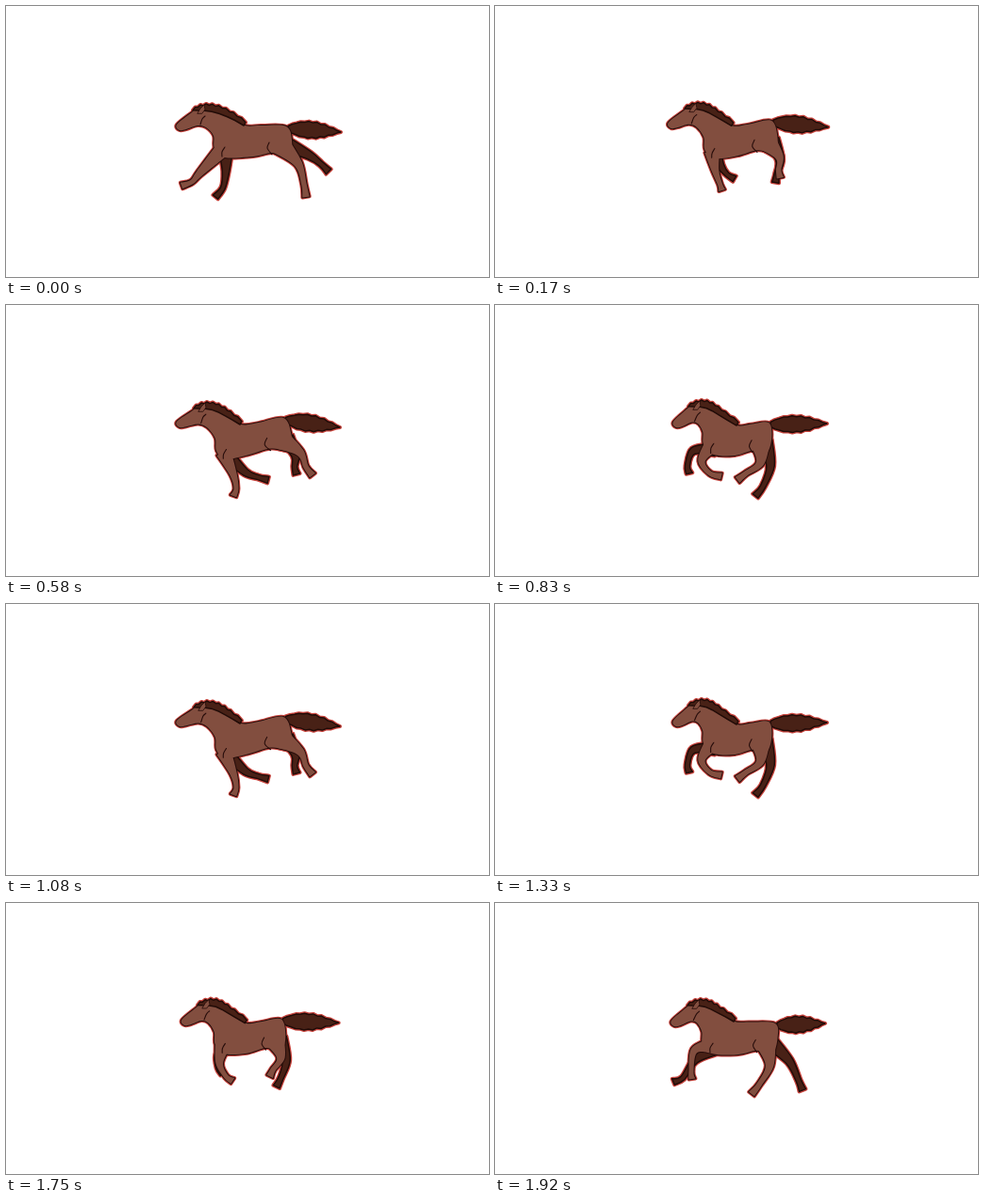
These frames come from a looping animation (512x288 px, 2.01 s). An HTML page:

```html
<!DOCTYPE html>
<html lang="en">
<head>
<meta charset="utf-8">
<title>Galloping horse</title>
<style>
html, body { margin: 0; width: 100%; height: 100%; overflow: hidden; background: #fff; }
svg { display: block; width: 100vw; height: 100vh; }
path { stroke-linejoin: round; stroke-linecap: round; }
.glow { fill: #c8453e; stroke: #c8453e; stroke-width: 4; }
.far { fill: #482116; stroke: #210b07; stroke-width: 1.5; }
.edge { fill: none; stroke: #260c0a; stroke-width: 2; }
.near { fill: #824e3f; }
.ear { fill: #824e3f; stroke: #260c0a; stroke-width: .8; }
.line { fill: none; stroke: #260c0a; stroke-width: 1.1; }
</style>
</head>
<body>
<svg id="stage" viewBox="0 0 512 288"></svg>
<script>
const LOOP = 2010, STEP = 250 / 3, STEPS = 24;
const stage = document.getElementById("stage");

const points = text => text.split(",").map(pair => pair.trim().split(" ").map(Number));
const mix = (a, b, k) => a.map((v, i) => v + (b[i] - v) * k);
const fmt = p => p.map(v => v.toFixed(1)).join(" ");
const range = n => Array.from({ length: n + 1 }, (_, i) => i / n);

// Catmull-Rom spline through the points, as cubic segments.
function curve(pts, closed = false) {
  const n = pts.length;
  const at = i => closed ? pts[(i + n) % n] : pts[Math.max(0, Math.min(n - 1, i))];
  let d = "";
  for (let i = 0; i < (closed ? n : n - 1); i++) {
    const [a, b, c, e] = [at(i - 1), at(i), at(i + 1), at(i + 2)];
    const c1 = b.map((v, j) => v + (c[j] - a[j]) / 6);
    const c2 = c.map((v, j) => v - (e[j] - b[j]) / 6);
    d += `C${fmt(c1)} ${fmt(c2)} ${fmt(c)}`;
  }
  return d;
}
const open = pts => `M${fmt(pts[0])}${curve(pts)}`;
const blob = pts => `M${fmt(pts[0])}${curve(pts, true)}Z`;
const poly = pts => `M${pts.map(fmt).join("L")}Z`;

// Both sides of a ribbon around a spine.
function sides(spine, widths) {
  const side = sign => spine.map(([x, y], i) => {
    const a = spine[Math.max(0, i - 1)], b = spine[Math.min(spine.length - 1, i + 1)];
    const dx = b[0] - a[0], dy = b[1] - a[1];
    const k = sign * widths[i] / 2 / Math.hypot(dx, dy);
    return [x - dy * k, y + dx * k];
  });
  return [side(1), side(-1).reverse()];
}
function limb(joints, widths) {
  const [left, right] = sides(joints, widths);
  return `M${fmt(left[0])}${curve(left)}L${fmt(right[0])}${curve(right)}Z`;
}
function bezier(a, b, c, u) {
  return mix(mix(a, b, u), mix(b, c, u), u);
}

// One resting horse; poses bend it by moving a few handles.
const body = points("181 126,197 113,203 108,216 109,236 117,253 127,271 127,297 128,303 143,300 159,282 156,262 160,232 161,221 151,220 138,212 129,203 127,191 131,184 132");
const ear = points("203 114,206 109,210 105,211 110,208 114");
const lines = ["279 145,277 151,282 158", "232 150,229 155,229 160", "211 117,208 120,206 126"].map(points);
const tailRoot = [299, 130];
const LEGS = [
  { hip: [229, 153], widths: [16, 7.5, 5, 7] },
  { hip: [233, 156], widths: [14, 7.5, 5, 7] },
  { hip: [291, 148], widths: [22, 8.5, 5.5, 7.5] },
  { hip: [297, 147], widths: [16, 8.5, 5.5, 7.5] }
];

// Handles: muzzle, poll, chest, withers, croup, thigh, belly.
// Legs: knee, fetlock and hoof of near front, far front, near hind, far hind.
const pose = (handles, tail, ...legs) => ({ handles: points(handles), tail, legs: legs.map(points) });
const reach = pose("182 127,203 108,221 148,253 127,297 128,301 157,262 160", [355, 134],
  "205 178,197 187,186 191", "233 176,230 193,222 203", "310 168,316 190,318 203", "322 159,334 168,342 176");
const land = pose("182 125,204 107,223 152,249 127,294 120,302 152,258 159", [354, 130],
  "241 180,244 195,241 203", "254 178,267 183,278 186", "312 157,318 172,325 181", "307 160,306 172,308 180");
const gather = pose("190 125,210 105,221 145,257 128,290 125,289 155,254 160", [352, 126],
  "219 166,228 179,240 182", "210 155,204 171,206 179", "281 168,266 179,257 186", "292 171,284 193,276 203");
const push = pose("188 126,209 106,220 147,254 126,297 128,295 158,258 161", [350, 128],
  "211 157,208 179,209 187", "212 167,199 186,189 190", "291 173,280 193,272 203", "312 168,322 189,326 199");
const between = (a, b, k) => {
  const all = (p, q) => p.map((v, i) => mix(v, q[i], k));
  return {
    handles: all(a.handles, b.handles), tail: mix(a.tail, b.tail, k),
    legs: a.legs.map((leg, i) => all(leg, b.legs[i]))
  };
};
const gallop = [reach, land, between(land, gather, 1 / 3), between(land, gather, 2 / 3), gather, push];

// Shifts a resting point with the handles, nearest ones strongest.
const bend = handles => ([x, y]) => {
  let sum = 0, sx = 0, sy = 0;
  reach.handles.forEach(([hx, hy], i) => {
    const weight = 1 / (1 + Math.hypot(x - hx, y - hy) ** 3);
    sum += weight;
    sx += weight * (handles[i][0] - hx);
    sy += weight * (handles[i][1] - hy);
  });
  return [x + sx / sum, y + sy / sum];
};

function tail(root, tip) {
  const us = range(13);
  const widths = us.map((u, i) =>
    (5 * (1 - u) + 14 * Math.sin(Math.PI * u ** 0.85)) * (1 + (i % 2 ? 0.16 : -0.16) * u));
  return poly(sides(us.map(u => mix(root, tip, u)), widths).flat());
}

function mane() {
  const top = range(16).map((u, i) => {
    const [x, y] = bezier([198, 110], [218, 95], [254, 123], u);
    return [x, y + (i % 2 ? -0.9 : 0.7)];
  });
  return [...top, ...range(6).map(u => bezier([252, 127], [225, 110], [203, 111], u))];
}

const draw = (kind, ...paths) => paths.map(d => `<path class="${kind}" d="${d}"/>`).join("");

function horse({ handles, tail: tip, legs }) {
  const move = bend(handles);
  const [nearFront, farFront, nearHind, farHind] = LEGS.map(({ hip, widths }, i) =>
    limb([move(hip), ...legs[i]], widths));
  const far = [farFront, farHind, tail(move(tailRoot), tip)];
  const near = [nearFront, nearHind, blob(body.map(move))];
  const hair = poly(mane().map(move));
  return draw("glow", ...far, ...near, hair)
    + draw("far", ...far) + draw("edge", ...near) + draw("near", ...near)
    + draw("far", hair) + draw("ear", poly(ear.map(move)))
    + draw("line", ...lines.map(line => open(line.map(move))));
}

stage.innerHTML = gallop.map(p => `<g display="none">${horse(p)}</g>`).join("");
let shown = -1;

function update(time) {
  const step = Math.min(STEPS - 1, Math.floor((time % LOOP + 4) / STEP));
  const index = step % gallop.length;
  if (index === shown) return;
  [...stage.children].forEach((g, i) => g.setAttribute("display", i === index ? "inline" : "none"));
  shown = index;
}

const start = performance.now();
function tick() {
  update(performance.now() - start);
  requestAnimationFrame(tick);
}
update(0);
requestAnimationFrame(tick);
</script>
</body>
</html>
```
